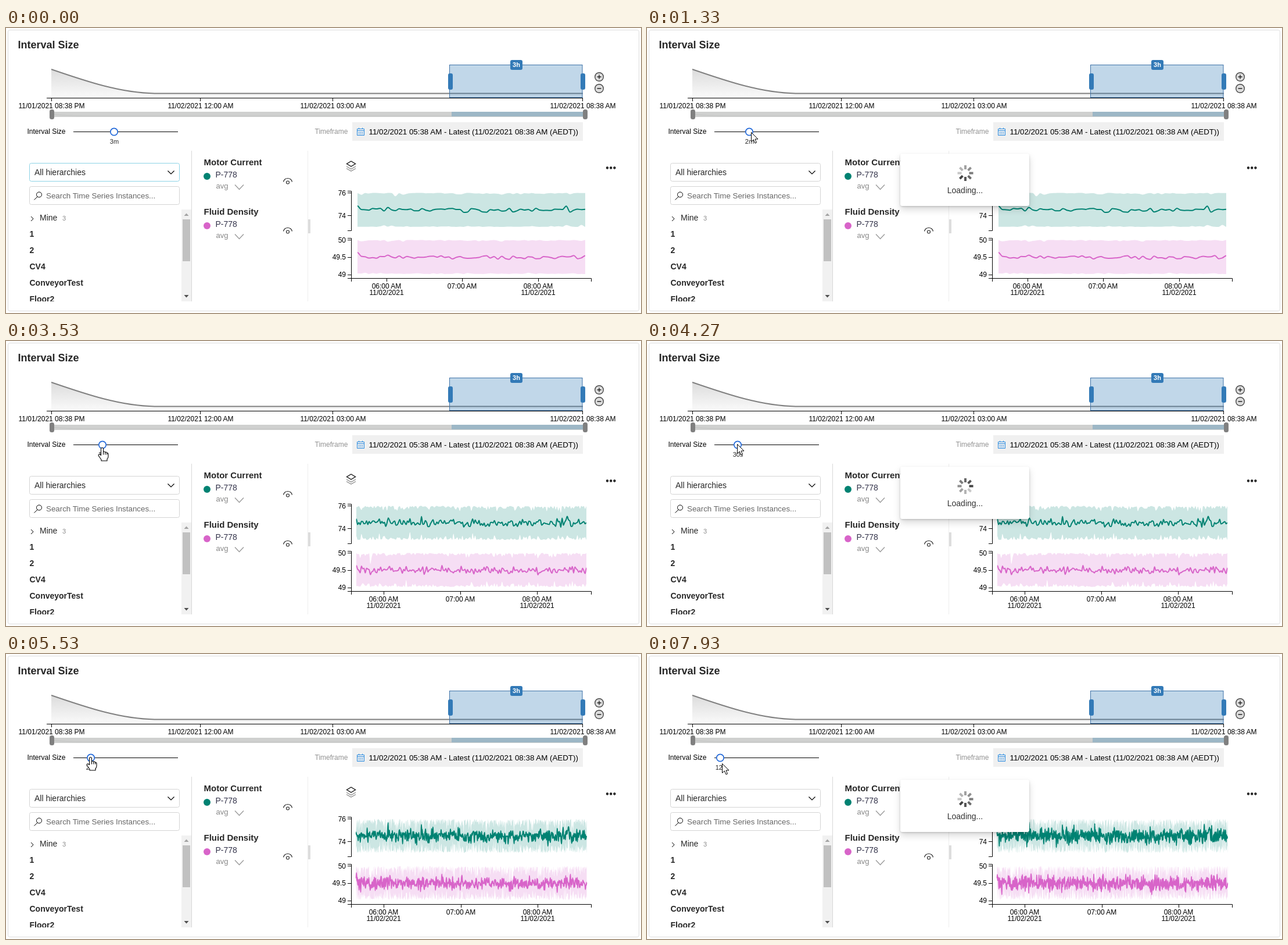
An HTML page for the animation above (8 s loop, 1093 by 490 pixels).

```html
<!DOCTYPE html>
<html lang="en">
<head>
<meta charset="utf-8">
<title>Interval Size</title>
<style>
html, body { margin: 0; width: 100%; height: 100%; overflow: hidden; background: #fff; }
svg { display: block; width: 1093px; height: 490px; font: 14px "Liberation Sans", Arial, sans-serif; fill: #262626; }
.b { font-weight: bold; }
.s { font-size: 12px; fill: #000; }
.m { text-anchor: middle; }
.line { fill: none; stroke: #000; }
.curve { fill: none; stroke-width: 2; stroke-linejoin: round; }
</style>
</head>
<body>
<svg viewBox="0 0 1093 490">
  <defs>
    <linearGradient id="fade" x2="0" y2="1"><stop stop-color="#dcdcdc"/><stop offset="1" stop-color="#fafafa"/></linearGradient>
    <filter id="shadow" x="-10%" y="-20%" width="120%" height="150%">
      <feDropShadow dx="0" dy="1.2" stdDeviation="1.8" flood-opacity=".18"/>
      <feDropShadow dx="0" dy="6" stdDeviation="6" flood-opacity=".15"/>
    </filter>
    <clipPath id="list"><path d="M20 300H302V470H20Z"/></clipPath>
    <g id="controls" fill="none">
      <path d="M394 269.5L401.5 277.5L409 269.5" stroke="#999" stroke-width="1.3"/>
      <path d="M477.5 264.5Q479 258.5 485 258.5T492.500 264.5" stroke="#222" stroke-width="1.1"/>
      <circle cx="485" cy="265.5" r="2.5" stroke="#222" stroke-width="1.1"/>
    </g>
  </defs>

  <rect x="3.5" y="3.5" width="1086" height="483" rx="3" fill="#fff" stroke="#ddd"/>
  <text x="20.5" y="35" class="b" font-size="18">Interval Size</text>

  <!-- availability overview -->
  <path d="M78 71C138.500 91.800 199 112.500 260 112.500H993V120H78Z" fill="url(#fade)"/>
  <path d="M78 71C138.500 91.800 199 112.500 260 112.500H993" class="curve" stroke="#808080"/>
  <path d="M70 120.5H993M78.5 120V126M334.5 120V126M562.5 120V126M992.5 120V126" class="line"/>
  <g class="s m">
    <text x="78.5" y="138">11/01/2021 08:38 PM</text>
    <text x="335" y="138">11/02/2021 12:00 AM</text>
    <text x="563" y="138">11/02/2021 03:00 AM</text>
    <text x="993" y="138">11/02/2021 08:38 AM</text>
  </g>
  <rect x="763.5" y="63.5" width="228.5" height="56" fill="#337ab7" fill-opacity=".3" stroke="#3f73a8"/>
  <g fill="#337ab7">
    <rect x="761" y="78" width="8" height="28" rx="3"/>
    <rect x="989" y="78" width="8" height="28" rx="3"/>
    <rect x="868" y="55" width="21" height="17" rx="3"/>
  </g>
  <text x="878.5" y="67" class="b m" font-size="11" fill="#fff">3h</text>
  <g fill="#ddd" stroke="#444" stroke-width="1.4">
    <circle cx="1021" cy="84" r="7.3"/><circle cx="1021" cy="104" r="7.3"/>
    <path d="M1017.5 84H1024.5M1021 80.5V87.5M1017.5 104H1024.5" stroke="#222"/>
  </g>
  <path d="M79 144H997V153H79Z" fill="#cfd0cf"/>
  <path d="M79 148Q100 151 130 151H767" fill="none" stroke="#c4c5c4"/>
  <path d="M767 144H997V152H767Z" fill="#9db7c6"/>
  <g fill="#808080"><rect x="75" y="140" width="8" height="17" rx="3.5"/><rect x="993" y="140" width="8" height="17" rx="3.5"/></g>

  <!-- interval and timeframe -->
  <text x="36.5" y="182" class="s">Interval Size</text>
  <path d="M116 178.5H296" class="line"/>
  <g id="thumb">
    <circle cy="178.5" r="6.2" fill="#fff" stroke="#2168d9" stroke-width="1.7"/>
    <text id="interval" x=".5" y="199" class="m" font-size="11"></text>
  </g>
  <text x="531.5" y="182" font-size="12" fill="#929292">Timeframe</text>
  <path d="M596 162H993V194H596Z" fill="#f0f0f0"/>
  <g fill="none" stroke="#2a8be0">
    <path d="M604.5 173.5H616.5V184.5H604.5ZM604.5 176.5H616.5M607.5 171.5V174M613.5 171.5V174"/>
    <path d="M606.5 179.5H615M606.5 182H615" stroke-dasharray="2 1"/>
  </g>
  <text x="624.5" y="183" font-size="13.333" fill="#000">11/02/2021 05:38 AM - Latest (11/02/2021 08:38 AM (AEDT))</text>

  <!-- hierarchy panel -->
  <rect id="select" x="40.5" y="232.5" width="258" height="31" rx="3" fill="#fff"/>
  <text x="49" y="253">All hierarchies</text>
  <path d="M278.5 245.5L284 251L289.5 245.5" class="line" stroke-width="1.2"/>
  <rect x="40.5" y="272.5" width="258" height="31" rx="3" fill="#fff" stroke="#d4d4d4"/>
  <g class="line">
    <circle cx="57" cy="286.5" r="4.5"/>
    <path d="M54 290L48.5 295.5M43 324L47 328L43 332"/>
  </g>
  <text x="69" y="293" font-size="13.333" fill="#666">Search Time Series Instances...</text>
  <text x="58" y="331">Mine</text>
  <text x="97" y="331" font-size="11" fill="#888">3</text>
  <g id="rows" class="b" clip-path="url(#list)"></g>
  <path d="M302 312H319V470H302Z" fill="#f1f1f1"/>
  <path d="M304 329H317V401H304Z" fill="#c1c1c1"/>
  <path d="M306.5 323L310.5 318.5L314.5 323Z" fill="#a3a3a3"/>
  <path d="M306.5 459L310.5 463.5L314.5 459Z" fill="#505050"/>
  <path d="M319.5 211V470" stroke="#d8d8d8"/>
  <path d="M519.5 211V470" stroke="#eee"/>
  <path d="M520 329H524V353H520Z" fill="#ddd"/>

  <!-- series legend -->
  <g class="b" font-size="15"><text x="340.5" y="236">Motor Current</text><text x="340.5" y="321">Fluid Density</text></g>
  <circle cx="346" cy="255" r="6" fill="#008272"/><circle cx="346" cy="340" r="6" fill="#d864c9"/>
  <g fill="#33334a"><text x="360.5" y="257">P-778</text><text x="360.5" y="342">P-778</text></g>
  <g font-size="13" fill="#888"><text x="361.5" y="276">avg</text><text x="361.5" y="361">avg</text></g>
  <use href="#controls"/><use href="#controls" y="85"/>

  <!-- chart -->
  <g fill="none" stroke-width="1.1">
    <path d="M586 238L594 242.5L602 238M586 241.5L594 246L602 241.5" stroke="#888"/>
    <path d="M594 229L601.5 233.5L594 238L586.5 233.5Z" stroke="#111" stroke-width="1.3"/>
  </g>
  <g fill="#777" stroke="#000" stroke-width="1.3"><circle cx="1035" cy="240.5" r="1.5"/><circle cx="1041.2" cy="240.5" r="1.5"/><circle cx="1047.4" cy="240.5" r="1.5"/></g>
  <g id="plots"></g>
  <path d="M588 280.5H594.5V348.5H588M588 283.5H594M588 322.5H594M588 361.5H594.5V430.5H588M588 364.5H594M588 394.5H594M588 424.5H594M594.5 436V430.5H1007.5V436" class="line"/>
  <g class="s" text-anchor="end">
    <text x="585" y="288">76</text><text x="585" y="327">74</text>
    <text x="585" y="369">50</text><text x="585" y="398">49.5</text><text x="585" y="428">49</text>
  </g>
  <g id="hours" class="s m"></g>

  <g id="popup">
    <rect x="436" y="216" width="222" height="90" rx="4" fill="#fff" filter="url(#shadow)"/>
    <g id="spinner" stroke="#444" stroke-width="4"></g>
    <text x="547.5" y="284" class="m" fill="#333">Loading...</text>
  </g>
  <g id="cursor" fill="#fff" stroke="#000" stroke-linejoin="round">
    <path id="arrow" d="M0 0V16L3.8 12.5L6.5 18.6L9 17.5L6.5 11.5H11.5Z"/>
    <path id="hand" stroke-width="1.1" d="M-2 13V2Q-2 0 0 0Q2 0 2 2V8Q2 6.5 3.7 6.5Q5.3 6.5 5.3 8.5Q5.5 7.3 7 7.5Q8.3 7.7 8.3 9.5Q10 8.3 10.5 10.5V15Q10.5 17.5 8.5 19.5V22.5H-1.5V20.5L-6 14Q-7 12 -5.5 11.5Q-4 11 -2 13ZM2 8V12M5.3 8.5V12M8.3 9.5V12"/>
  </g>
</svg>
<script>
const LOOP = 8000, SAMPLE = 2.5, SPAN = 10800;
const $ = id => document.getElementById(id);
const NS = 'http://www.w3.org/2000/svg';

function add(parent, tag, attrs, text = '') {
  const node = parent.appendChild(document.createElementNS(NS, tag));
  for (const key in attrs) node.setAttribute(key, attrs[key]);
  node.textContent = text;
  return node;
}

function random(seed) {
  return () => {
    seed = (seed * 1664525 + 1013904223) % 4294967296;
    return seed / 4294967296;
  };
}

// Bucket length, plot extent, position of 06:00 and pixels per hour
const scales = [
  { sec: 180, x0: 605, x1: 997, six: 655, hour: 130.5 },
  { sec: 120, x0: 604, x1: 998, six: 653, hour: 131.5 },
  { sec: 60, x0: 603, x1: 999, six: 650.5, hour: 132.2 },
  { sec: 30, x0: 602.5, x1: 999.5, six: 652, hour: 132 },
  { sec: 20, x0: 602.5, x1: 999.5, six: 650.5, hour: 132.7 },
  { sec: 15, x0: 602.5, x1: 999.5, six: 650.5, hour: 132.7 }
];

const series = [
  { color: '#008272', band: '#cce6e3', top: 283.5, bottom: 342, first: 306, seed: 778 },
  { color: '#d864c9', band: '#f6def4', top: 364.5, bottom: 423, first: 386, seed: 4951 }
].map(s => {
  const rand = random(s.seed);
  s.raw = Array.from({ length: 4400 }, () => s.top + (s.bottom - s.top) * rand());
  s.area = add($('plots'), 'path', { fill: s.band });
  s.line = add($('plots'), 'path', { class: 'curve', stroke: s.color });
  return s;
});

// Monotone cubic through evenly spaced points
function curve(ys, x0, step) {
  const slope = ys.map((y, i) => {
    const a = y - ys[i - 1], b = ys[i + 1] - y;
    return a * b > 0 ? 2 * a * b / (a + b) : 0;
  });
  let d = `${x0} ${ys[0].toFixed(1)}`;
  for (let i = 1; i < ys.length; i++) {
    const x = x0 + i * step;
    d += 'C' + [x - step * 2 / 3, ys[i - 1] + slope[i - 1] / 3, x - step / 3, ys[i] - slope[i] / 3, x, ys[i]]
      .map(v => v.toFixed(2)).join(' ');
  }
  return d;
}

function buildPaths(s, { sec, x0, x1 }) {
  const size = sec / SAMPLE, count = SPAN / sec, step = (x1 - x0) / count;
  const buckets = Array.from({ length: count + 1 }, (_, i) => s.raw.slice(i * size, (i + 1) * size));
  const mean = buckets.map(b => b.reduce((sum, v) => sum + v, 0) / b.length);
  mean[0] = s.first;
  const high = buckets.map(b => Math.min(...b));
  const low = buckets.map(b => Math.max(...b)).reverse();
  return {
    line: 'M' + curve(mean, x0, step),
    area: 'M' + curve(high, x0, step) + 'L' + curve(low, x1, -step) + 'Z'
  };
}

scales.forEach(scale => scale.paths = series.map(s => buildPaths(s, scale)));

['1', '2', 'CV4', 'ConveyorTest', 'Floor2'].forEach((name, i) =>
  add($('rows'), 'text', { x: 40.5, y: 359 + 28 * i }, name));

const hours = [0, 1, 2].map(i => {
  const g = add($('hours'), 'g', {});
  add(g, 'path', { d: 'M.5 430V436', class: 'line' });
  add(g, 'text', { y: 448 }, `0${6 + i}:00 AM`);
  if (i !== 1) add(g, 'text', { y: 459 }, '11/02/2021');
  return g;
});

const spokes = Array.from({ length: 8 }, (_, i) =>
  add($('spinner'), 'path', { d: 'M0 -6.5V-13.5', transform: `translate(548 249.5) rotate(${i * 45})` }));

const labels = ['3m', '2m', '1m', '30s', '20s', '15s', '12s'];
const drags = [1000, 2330, 3660, 4730, 5860, 7130];
const loads = [[1330, 1670], [2600, 3130], [3930, 4400], [5000, 5500], [6200, 6770], [7400, 8000]];

// time, x, y of the pointer tip
const route = [
  [70, 22, 225], [400, 110, 172], [650, 165, 167], [800, 186, 178], [1000, 186, 178], [1070, 179, 178],
  [1330, 179, 179], [1530, 177, 185], [2130, 177, 186], [2270, 175, 186], [2400, 167, 185],
  [3460, 167, 185], [3530, 165, 183], [3730, 156, 178], [4670, 155, 177], [4800, 145, 177],
  [5800, 145, 177], [5930, 137, 178], [7070, 137, 178], [7200, 129, 179], [7400, 129, 188], [8000, 129, 188]
];

function pointerAt(t) {
  const i = Math.max(1, route.findIndex(p => p[0] >= t));
  const [a, b] = [route[i - 1], route[i]];
  const k = Math.max(0, (t - a[0]) / (b[0] - a[0]));
  return [1, 2].map(j => Math.round(a[j] + (b[j] - a[j]) * k) + 0.5);
}

const show = (node, on) => node.setAttribute('visibility', on ? 'visible' : 'hidden');
let shown = -1;

function drawChart(index) {
  if (index === shown) return;
  shown = index;
  const scale = scales[index];
  series.forEach((s, i) => {
    s.line.setAttribute('d', scale.paths[i].line);
    s.area.setAttribute('d', scale.paths[i].area);
  });
  hours.forEach((g, i) => g.setAttribute('transform', `translate(${Math.round(scale.six + i * scale.hour - 0.5)})`));
}

function render(t) {
  const notch = drags.filter(d => t >= d).length;
  $('thumb').setAttribute('transform', `translate(${186 - 10 * notch})`);
  $('interval').textContent = labels[notch];
  drawChart(loads.filter(l => t >= l[1]).length);

  const load = loads.find(l => t >= l[0] && t < l[1]);
  show($('popup'), load);
  if (load) {
    const head = Math.floor((t - load[0]) / 66) + 5;
    spokes.forEach((s, i) => s.setAttribute('stroke-opacity', 1 - ((head - i + 16) % 8) * 0.1));
  }

  const blur = Math.min(1, Math.max(0, (t - 660) / 140));
  const mix = (a, b) => Math.round(a + (b - a) * blur);
  $('select').setAttribute('stroke', `rgb(${mix(140, 212)},${mix(211, 212)},${mix(230, 212)})`);

  const hand = t >= 730 && !load;
  show($('cursor'), t >= 70);
  $('cursor').setAttribute('transform', `translate(${pointerAt(t).join(' ')})`);
  $('hand').style.display = hand ? '' : 'none';
  $('arrow').style.display = hand ? 'none' : '';
}

const start = performance.now();
function tick() {
  render((performance.now() - start) % LOOP);
  requestAnimationFrame(tick);
}
tick();
</script>
</body>
</html>
```
